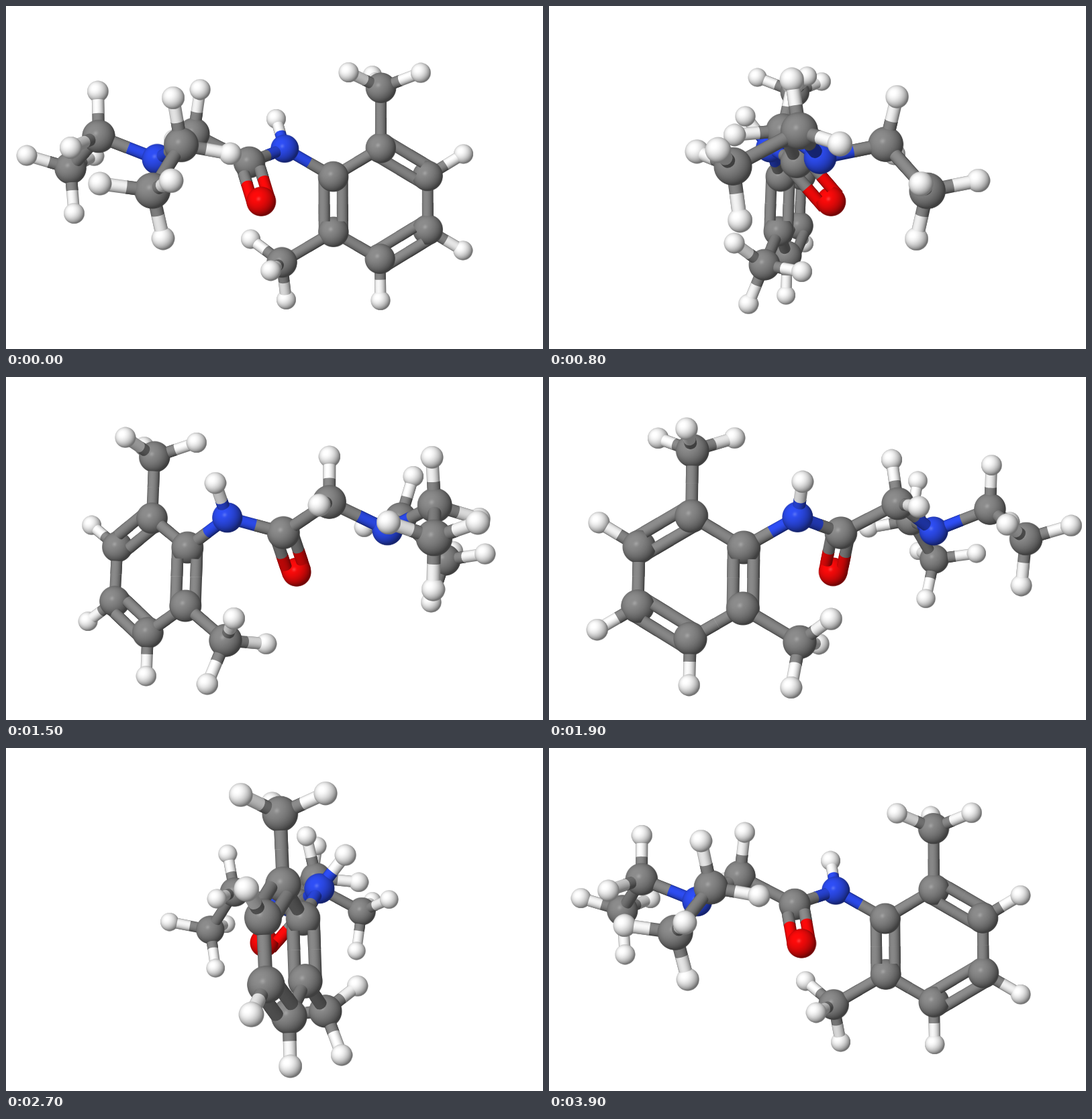
An HTML page with a canvas for the animation above (4 s loop, 800 px wide and 512 px high).

```html
<!DOCTYPE html>
<html lang="en">
<head>
<meta charset="utf-8">
<title>Rotating molecule</title>
<style>
html, body { margin: 0; width: 100%; height: 100%; overflow: hidden; background: #fff; }
canvas { display: block; }
</style>
</head>
<body>
<canvas id="stage" width="800" height="512"></canvas>
<script>
const ctx = document.getElementById('stage').getContext('2d');
ctx.imageSmoothingQuality = 'high';
const STEPS = 40, STEP_MS = 100;
const CAMERA = 1792, STICK = 8.9;
const LIGHT = { side: -0.348, front: 0.87 };   // side applies to both x and y

const ELEMENTS = {
  C: { radius: 23.9, rgb: [140, 140, 140] },
  N: { radius: 21.9, rgb: [46, 78, 246] },
  O: { radius: 21.6, rgb: [255, 10, 10] },
  H: { radius: 15.5, rgb: [255, 255, 255] }
};

// Positions relative to the rotation centre: x right, y down, z towards the viewer.
const atoms = [
  // ring, carbonyl
  ['C', 92, -1.5, -91.4], ['C', 167, -46.5, -98], ['C', 241.8, -2.5, -107],
  ['C', 242.6, 82.7, -111.5], ['C', 166.5, 128.6, -106.6], ['C', 92.5, 85.5, -95],
  ['C', -38, -23, -19.7], ['O', -19.5, 35.3, 27.3],
  // ring hydrogens
  ['H', 299.4, -37.3, -114], ['H', 299.7, 116.3, -121], ['H', 167.6, 194.7, -109],
  // upper and lower methyl
  ['C', 166.8, -140.8, -93.3], ['H', 113.8, -161.7, -54.3], ['H', 225.9, -162, -66], ['H', 158.5, -166, -156],
  ['C', 11.5, 133, -88.6], ['H', -37.8, 98, -118], ['H', -5.6, 140.7, -22.8], ['H', 18.6, 194.4, -117.4],
  // amide nitrogen, methylene, amine nitrogen
  ['N', 15.9, -45, -81], ['H', 2.6, -93.3, -116.3],
  ['C', -121, -65.8, -11.5], ['H', -110.8, -131.3, 0], ['H', -155.8, -59, -70],
  ['N', -169, -26.5, 58.7],
  // first ethyl
  ['C', -253.5, -59.5, 58], ['H', -256, -125, 48.7], ['H', -283, -41.5, 121],
  ['C', -306, -14, -11.8], ['H', -370, -33, -5], ['H', -279.4, -33.5, -72.4], ['H', -299.3, 53.7, -4.9],
  // second ethyl
  ['C', -128.2, -45, 138.7], ['H', -137.7, -108.5, 156.9], ['H', -61, -33, 133.6],
  ['C', -161.2, 17.4, 203.7], ['H', -148.7, 81.4, 186.2], ['H', -229.5, 8, 211], ['H', -131, 4, 265.5]
].map(([el, x, y, z]) => ({ el, x, y, z, ...ELEMENTS[el] }));

const doubles = new Set(['0-5', '1-2', '3-4', '6-7']);
const bonds = [];
atoms.forEach((a, i) => atoms.forEach((b, j) => {
  if (j <= i || (a.el === 'H' && b.el === 'H')) return;
  const length = Math.hypot(a.x - b.x, a.y - b.y, a.z - b.z);
  if (length < 108) bonds.push({ i, j, length, double: doubles.has(i + '-' + j) });
}));

const lerp = (a, b, t) => a + (b - a) * t;

// Ambient plus diffuse light; gloss blends towards white.
function shade(rgb, light, gloss = 0) {
  const k = 0.45 + 0.55 * Math.min(1, Math.max(0, light) * 1.02);
  return rgb.map(c => Math.round(lerp(c * k, 255, gloss)));
}

function makeBall(rgb) {
  const size = 96, half = size / 2, rim = half - 1;
  const sprite = document.createElement('canvas');
  sprite.width = sprite.height = size;
  const pen = sprite.getContext('2d');
  const image = pen.createImageData(size, size);
  for (let p = 0; p < size * size; p++) {
    const x = (p % size + 0.5 - half) / rim;
    const y = (Math.floor(p / size) + 0.5 - half) / rim;
    const dist = Math.hypot(x, y);
    const z = Math.sqrt(Math.max(0, 1 - dist * dist));
    const light = (x + y) * LIGHT.side + z * LIGHT.front;
    const mirror = Math.max(0, 2 * light * z - LIGHT.front);
    const alpha = 255 * Math.min(1, Math.max(0, (1 - dist) * rim + 0.5));
    image.data.set([...shade(rgb, light, 0.2 * mirror ** 30), alpha], p * 4);
  }
  pen.putImageData(image, 0, 0);
  return { sprite, reach: half / rim };
}
for (const el in ELEMENTS) ELEMENTS[el].ball = makeBall(ELEMENTS[el].rgb);

function project(atom, cos, sin) {
  const x = atom.x * cos + atom.z * sin;
  const z = atom.z * cos - atom.x * sin;
  const f = CAMERA / (CAMERA - z);
  return { ...atom, x: 400 + x * f, y: 256 + atom.y * f, z, f, r: atom.radius * f };
}

function drawBall({ el, x, y, r }) {
  const { sprite, reach } = ELEMENTS[el].ball;
  const h = r * reach;
  ctx.drawImage(sprite, x - h, y - h, h * 2, h * 2);
}

// A piece of cylinder from its far end to its near end; the far end shows a curved rim.
function drawStick(x1, y1, x2, y2, angle, w, tilt, rgb) {
  const cos = Math.cos(angle), sin = Math.sin(angle);
  const across = LIGHT.side * (cos - sin);
  const top = LIGHT.front * Math.sqrt(1 - tilt * tilt) - LIGHT.side * tilt * (cos + sin);
  const g = ctx.createLinearGradient(0, -w, 0, w);
  for (let s = -1; s <= 1; s += 0.125) {
    const light = top * Math.sqrt(1 - s * s) + across * s;
    g.addColorStop((s + 1) / 2, `rgb(${shade(rgb, light)})`);
  }
  const length = Math.hypot(x2 - x1, y2 - y1);
  ctx.save();
  ctx.translate(x1, y1);
  ctx.rotate(angle);
  ctx.fillStyle = g;
  ctx.beginPath();
  ctx.moveTo(length, w);
  ctx.ellipse(0, 0, w * tilt, w, 0, Math.PI / 2, Math.PI * 1.5);
  ctx.lineTo(length, -w);
  ctx.closePath();
  ctx.fill();
  ctx.restore();
}

function addBond(items, bond, balls) {
  let a = balls[bond.i], b = balls[bond.j];
  if (a.z > b.z) [a, b] = [b, a];
  const dx = b.x - a.x, dy = b.y - a.y;
  const flat = Math.hypot(dx, dy) || 1;
  const angle = Math.atan2(dy, dx);
  const scale = (a.f + b.f) / 2;
  const w = STICK * scale;
  const tilt = Math.min(1, (b.z - a.z) / bond.length);
  const offset = bond.double ? w + flat / 16 : 0;
  const inside = a.radius ** 2 - STICK ** 2 - (offset / scale) ** 2;
  const exit = Math.min(0.48, Math.sqrt(Math.max(0, inside)) / bond.length);

  for (const side of bond.double ? [-1, 1] : [0]) {
    const ox = -dy / flat * offset * side, oy = dx / flat * offset * side;
    const add = (z, from, to, rgb) => items.push({
      z,
      draw: () => drawStick(
        a.x + dx * from + ox, a.y + dy * from + oy,
        a.x + dx * to + ox, a.y + dy * to + oy, angle, w, tilt, rgb)
    });
    add(a.z - 0.1, 0, 0.5, a.rgb);
    add(lerp(a.z, b.z, 0.25) + 0.02, exit, 0.5, a.rgb);
    add(lerp(a.z, b.z, 0.75) - 0.02, 0.5, 1, b.rgb);
  }
}

function render(now) {
  const step = Math.floor(now / STEP_MS) % STEPS;
  const angle = step / STEPS * Math.PI * 2;
  const cos = Math.cos(angle), sin = Math.sin(angle);
  const balls = atoms.map(atom => project(atom, cos, sin));
  const items = balls.map(ball => ({ z: ball.z, draw: () => drawBall(ball) }));
  bonds.forEach(bond => addBond(items, bond, balls));
  items.sort((p, q) => p.z - q.z);

  ctx.fillStyle = '#fff';
  ctx.fillRect(0, 0, 800, 512);
  items.forEach(item => item.draw());
}

const start = performance.now();
function tick() {
  render(performance.now() - start);
  requestAnimationFrame(tick);
}
tick();
</script>
</body>
</html>
```
